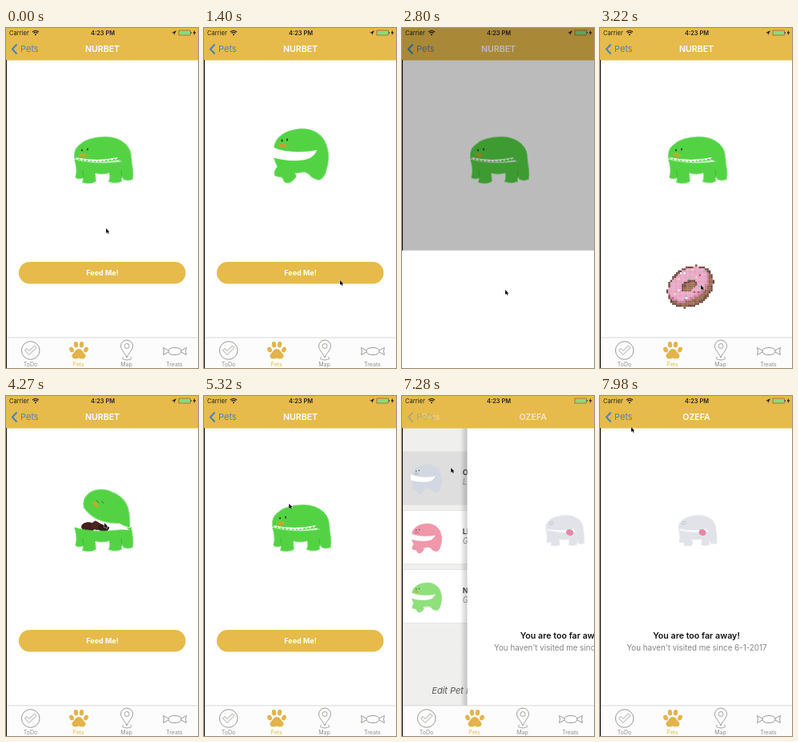
Recreate the animation shown at these times as an HTML page with a canvas. Size 240x426 px, loop 8 s.

```html
<!DOCTYPE html>
<html lang="en">
<head>
<meta charset="utf-8">
<style>
html, body { margin: 0; height: 100%; overflow: hidden; background: #fff; }
canvas { display: block; width: 100vw; height: 100vh; }
</style>
</head>
<body>
<canvas id="stage"></canvas>
<script>
const W = 240, H = 426, LOOP = 8000;
const GOLD = '#e6bb4b', GREEN = '#53d344', GRAY = '#8f8f8f';
const UI = 'Inter, sans-serif';
const canvas = document.getElementById('stage');
const ctx = canvas.getContext('2d');

const clamp = v => Math.max(0, Math.min(1, v));
const span = (t, start, length) => clamp((t - start) / length);
const smooth = v => v * v * (3 - 2 * v);
const easeOut = v => 1 - (1 - v) ** 3;
const mix = (a, b, k) => a + (b - a) * k;

// Blends two paths that share the same commands.
function mixPath(from, to, k) {
  const ends = to.match(/[\d.]+/g);
  let i = 0;
  return from.replace(/[\d.]+/g, n => mix(+n, +ends[i++], k).toFixed(2));
}

function layer(draw, x = 0, y = 0, alpha = 1) {
  ctx.save();
  ctx.translate(x, y);
  ctx.globalAlpha *= alpha;
  draw();
  ctx.restore();
}

function rect(x, y, w, h, color) {
  ctx.fillStyle = color;
  ctx.fillRect(x, y, w, h);
}

function shape(d, color, stroke = 0) {
  const path = new Path2D(d);
  if (stroke) {
    ctx.strokeStyle = color;
    ctx.lineWidth = stroke;
    ctx.stroke(path);
  } else {
    ctx.fillStyle = color;
    ctx.fill(path);
  }
}

function oval(x, y, rx, ry, color, angle = 0) {
  ctx.fillStyle = color;
  ctx.beginPath();
  ctx.ellipse(x, y, rx, ry, angle, 0, 7);
  ctx.fill();
}

function text(str, x, y, font, color, align = 'center') {
  ctx.font = font;
  ctx.fillStyle = color;
  ctx.textAlign = align;
  ctx.fillText(str, x, y);
}

function fur(d, color) {
  shape(d, color);
  ctx.setLineDash([1.3, .9]);
  shape(d, color, 1.8);
  ctx.setLineDash([]);
}

const BODY = 'M86 165Q110 172 142 168L156 165Q159 177 158 189Q152 192 147 189L144 182L144 192Q136 195 129 192Q131 186 129 181Q120 184 111 181L112 192Q104 196 96 193L97 187Q91 190 87 187Q90 178 86 165Z';
const HEAD_SHUT = 'M86 163C85 153 89 149 93 146C102 137 124 135 135 138C149 142 158 152 156 167Q149 169 140 165Q110 171 86 163Z';
const HEAD_OPEN = 'M98 140C96 133 98 128 102 124C108 117 123 115 133 121C148 127 156 138 154 164Q148 163 142 159Q112 160 98 140Z';

function standingPet({ color = GREEN, open = 0, food = false, asleep = false }) {
  if (food) {
    oval(103, 164, 9, 6, '#42201c');
    oval(114, 162, 7, 6, '#4b2520');
    oval(122, 165, 7, 5, '#35191a');
  }
  fur(BODY, color);
  if (!asleep) shape('M97 187L96 178M145 188L144 178', '#3fbd35', 1);

  if (open > .05) {
    shape(mixPath('M86 162Q112 170 156 167L140 164Z', 'M97 139Q112 167 154 168L142 157Z', open), '#fff');
  }
  fur(mixPath(HEAD_SHUT, HEAD_OPEN, open), color);
  if (open < .2) {
    let teeth = 'M87 162';
    for (let i = 0; i <= 22; i++) {
      teeth += `L${87 + i * 2.4} ${162 + 4 * Math.sin(Math.PI * i / 22) + (i % 2 ? 2.5 : 0)}`;
    }
    shape(teeth + 'Q113 168 87 162Z', '#fff');
  }
  if (asleep) {
    shape('M91 153Q96 156 101 151M92 150L100 148', '#aeb1ba', 1);
    oval(131, 169, 7, 6, '#e887a8', .4);
    return;
  }
  layer(() => {
    ctx.rotate(.6 * open);
    oval(0, 0, 5, 2.6, '#a9b52f', .1);
    oval(0, 1, 3.2, 1.2, '#d0a030');
    if (open > .4) shape('M-2 -5L2 -4M4 -8L8 -7', '#3c8a33', 1);
    else {
      oval(-1, -6, .9, 1.6, '#1e3d1e');
      oval(6, -7, .9, 1.6, '#1e3d1e');
    }
  }, mix(96, 112, open), mix(159, 136, open));
}

function leaningPet(color, beak = '#c4a233') {
  fur('M88 151C88 139 100 130 112 128C128 124 141 129 148 138C156 149 157 164 153 176Q151 187 144 190Q138 189 134 186Q131 181 124 180Q117 182 113 181L115 186Q108 196 101 193L98 187L89 185Q87 180 92 174L87 161Z', color);
  shape('M85 149Q108 159 141 153Q137 165 119 166Q101 167 85 162Z', '#fff');
  oval(98, 147, 5, 2.6, beak, .1);
  oval(97.5, 141, 1, 1.7, '#24402a');
  oval(104, 140, 1, 1.7, '#24402a');
}

function scaledPet(x, y, scale, draw) {
  layer(() => {
    ctx.scale(scale, scale);
    ctx.translate(-121, -163);
    draw();
  }, x, y);
}

function donut(x, y) {
  const cell = 2.4, tilt = -.6;
  const sprinkles = ['#f2dc8c', '#86bcc4', '#fbeef2', '#c8486f'];
  for (let r = -12; r <= 12; r++) for (let c = -13; c <= 13; c++) {
    const px = c * cell, py = r * cell;
    const inside = (a, b, dx = 0, dy = 0) => {
      const u = (px - dx) * Math.cos(tilt) + (py - dy) * Math.sin(tilt);
      const v = (py - dy) * Math.cos(tilt) - (px - dx) * Math.sin(tilt);
      return (u / a) ** 2 + (v / b) ** 2 < 1;
    };
    if (!inside(31, 24)) continue;
    let color = '#95654a';
    if (!inside(28.8, 21.8)) color = '#70483c';
    else if (inside(11, 6.5, -2, -1)) color = inside(9, 5, -1, 1) ? '#9a6b50' : '#754b42';
    else if (inside(27, 17.5, -3, -4)) {
      const n = ((c * 37 + r * 61 + c * r * 7) % 23 + 23) % 23;
      color = n < 2 ? sprinkles[(c * c + r + 40) % 4] : '#e7a4c3';
    } else if (inside(28.5, 19.5, -2, -3)) color = '#c97e9f';
    rect(x + px - cell / 2, y + py - cell / 2, cell + .1, cell + .1, color);
  }
}

function button(pressed) {
  layer(() => {
    ctx.fillStyle = GOLD;
    ctx.beginPath();
    ctx.roundRect(16, 293, 208.5, 27.5, 13.5);
    ctx.fill();
    text('Feed Me!', 120.5, 310, '700 9px ' + UI, pressed ? '#f3e3bb' : '#fff');
  }, 0, 0, pressed ? .8 : 1);
}

function statusBar(locating) {
  text('Carrier', 4, 8.6, '400 7.6px ' + UI, '#222', 'left');
  text('4:23 PM', 121, 8.6, '600 7.4px ' + UI, '#222');
  shape('M33 5Q37 1.5 41 5M34.5 6.5Q37 4.3 39.5 6.5', '#222', 1.1);
  oval(37, 8.2, 1, 1, '#222');
  if (locating) shape('M207 6L213 3L210 9L209.7 6.3Z', '#222');
  ctx.strokeStyle = '#555';
  ctx.lineWidth = .6;
  ctx.strokeRect(216, 3, 14.5, 6);
  rect(217, 4, 12.5, 4, '#7fe07c');
  rect(231, 5, 1, 2, '#555');
  shape('M236 2.5L233.5 6.5H235.3L234.5 9.5L237.5 5.3H235.6Z', '#222');
}

function header(name, list) {
  rect(0, 0, W, 40.5, GOLD);
  statusBar(list === 0);
  const shift = 127, font = '600 10.6px ' + UI;
  layer(() => text('Pets', 120, 30, font, '#fff'), -shift * (1 - list), 0, list);
  layer(() => text(name, 120.5, 30, font, '#fff'), shift * list, 0, 1 - list);
  layer(() => {
    shape('M13.5 20.5L8 26.5L13.5 32.5', '#3f86bd', 2);
    text('Pets', 18, 30, '400 11px ' + UI, '#4b87ae', 'left');
  }, 0, 0, clamp(1 - 2 * list));
}

function tabBar() {
  rect(0, 388, W, 38, '#fcfcfc');
  rect(0, 387.5, W, .8, '#d0d0d0');
  ['ToDo', 'Pets', 'Map', 'Treats'].forEach((label, i) =>
    text(label, 30.5 + i * 60, 424, '400 7px ' + UI, i === 1 ? GOLD : GRAY));
  const line = '#9d9994';
  shape('M42 404A11.3 11.3 0 1 1 19.4 404A11.3 11.3 0 1 1 42 404Z', line, 1);
  shape('M23.5 404L26 401.5L29 404.5L35.5 398L38 400.5L29 409.5Z', line, .9);
  const paw = '#e2b44a';
  shape('M91 402C95 402 96 406 99 409C101 413 97 416 91 413.5C85 416 81 413 83 409C86 406 87 402 91 402Z', paw);
  oval(82, 403, 2.7, 3.6, paw, -.4);
  oval(87.5, 396.8, 2.7, 3.7, paw, -.1);
  oval(94.5, 396.8, 2.7, 3.7, paw, .1);
  oval(100, 403, 2.7, 3.6, paw, .4);
  shape('M151 413C148 406 143.5 403 143.5 398.5A7.5 7.5 0 0 1 158.5 398.5C158.5 403 154 406 151 413Z', line, 1);
  shape('M154 398.5A3 3 0 1 1 148 398.5A3 3 0 1 1 154 398.5ZM147 412Q142 415 151 416Q160 415 155 412', line, .9);
  shape('M203 405Q203 400.5 211 400.5Q219 400.5 219 405Q219 409.5 211 409.5Q203 409.5 203 405ZM203 404L196.5 400.5L197.5 405L196.5 409.5L203 406M219 404L225.5 400.5L224.5 405L225.5 409.5L219 406', line, 1);
}

const rows = [
  ['OZEFA', 'Library', '#d3d7e2', '#bfc3d2'],
  ['LIDOA', 'Grocery Store', '#f097aa', '#db8291'],
  ['NURBET', 'Gym', '#8fe07c', '#b8b949'],
];

function listPage(pressed) {
  rect(0, 40, W, 348, '#efefee');
  rows.forEach(([name, place, color, beak], i) => {
    const y = 70 + i * 74;
    rect(0, y - 1, W, 68, '#e5e5e4');
    rect(0, y, W, 66, pressed && i === 0 ? '#dedede' : '#fff');
    scaledPet(36, y + 36, .55, () => leaningPet(color, beak));
    text(name, 81, y + 29, '600 9px ' + UI, '#333', 'left');
    text(place, 81, y + 40.5, 'italic 400 9.7px ' + UI, '#8c8c8c', 'left');
  });
  text('Edit Pet Names and Locations', 121, 373, 'italic 400 11px ' + UI, '#555');
}

function greenPage(t) {
  rect(0, 40, W, 348, '#fff');
  if (t > 980 && t < 1680) leaningPet(GREEN);
  else {
    const chewing = t > 3430 && t < 5110;
    const open = chewing ? .5 + .5 * Math.cos(2 * Math.PI * (t - 4270) / 560) : 0;
    standingPet({ open, food: t > 3800 && t < 5000 });
  }
  if (t < 2700 || t > 3800) button(t > 1900 && t < 2150);
  else {
    const lift = smooth(span(t, 3300, 420));
    donut(113 - 3 * lift, 324 - 161 * lift);
  }
}

function farPage() {
  rect(0, 40, W, 348, '#fff');
  scaledPet(121.5, 167, .66, () => standingPet({ color: '#e1e3e9', asleep: true }));
  text('You are too far away!', 120.5, 304, '600 10.7px ' + UI, '#111');
  text("You haven't visited me since 6-1-2017", 121, 319, '400 9.8px ' + UI, '#858585');
}

const cursorStops = [
  [0, 125, 251], [500, 125, 251], [1400, 170, 316], [1850, 162, 306], [2100, 162, 306],
  [2600, 130, 330], [3220, 126, 322], [3300, 126, 322], [3720, 123, 160], [4400, 123, 159],
  [5200, 110, 140], [6150, 24, 26], [6560, 24, 26], [6980, 62, 92], [7200, 62, 92],
  [7900, 39, 39], [8000, 39, 39],
];

function cursor(t) {
  const next = cursorStops.findIndex(stop => stop[0] > t);
  const [t0, x0, y0] = cursorStops[next - 1], [t1, x1, y1] = cursorStops[next];
  const k = smooth((t - t0) / (t1 - t0));
  layer(() => {
    const arrow = 'M0 0V6L1.5 4.8L2.6 7L3.6 6.5L2.6 4.4H4.4Z';
    shape(arrow, '#fff', .8);
    shape(arrow, '#111');
  }, mix(x0, x1, k), mix(y0, y1, k));
}

function draw(t) {
  rect(0, 0, W, H, '#fff');
  const second = t > 7100;
  const list = second ? 1 - easeOut(span(t, 7130, 500)) : easeOut(span(t, 6374, 500));
  if (list > 0) layer(() => listPage(second), -8 * (1 - list));
  if (list < 1) layer(() => {
    if (list > 0) {
      const shade = ctx.createLinearGradient(-9, 0, 0, 0);
      shade.addColorStop(0, '#0000');
      shade.addColorStop(1, '#0003');
      rect(-9, 40, 9, 348, shade);
    }
    second ? farPage() : greenPage(t);
  }, W * list);
  header(second ? rows[0][0] : rows[2][0], list);
  tabBar();
  rect(0, 40, 1, 386, '#111');

  const dim = .4 * span(t, 1970, 150) * (1 - span(t, 2700, 300));
  rect(0, 0, W, H, `rgba(0,0,0,${dim})`);
  const sheet = smooth(span(t, 1974, 350)) * (1 - smooth(span(t, 2700, 300)));
  rect(0, H - 200 * sheet, W, 200 * sheet, '#fff');
  cursor(t);
}

function frame(now) {
  const dpr = window.devicePixelRatio || 1;
  if (canvas.width !== Math.round(W * dpr)) {
    canvas.width = Math.round(W * dpr);
    canvas.height = Math.round(H * dpr);
  }
  ctx.setTransform(dpr, 0, 0, dpr, 0, 0);
  draw(now % LOOP);
  requestAnimationFrame(frame);
}
requestAnimationFrame(frame);
</script>
</body>
</html>
```
